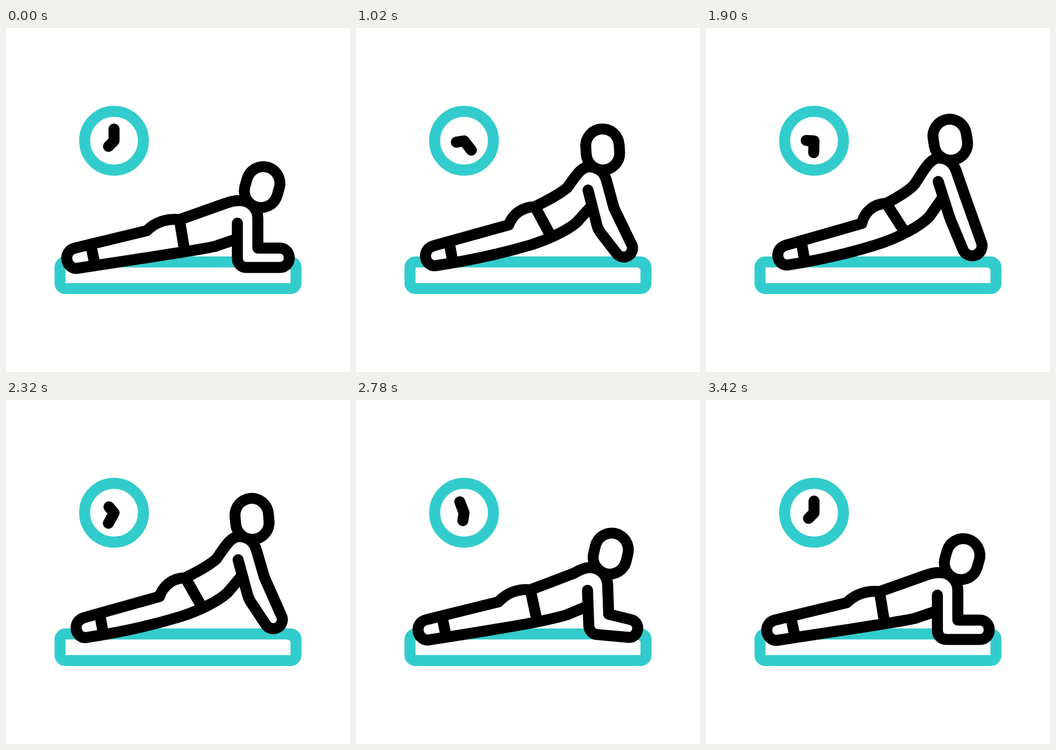
Write an HTML page that moves like this. It is 640x640 px and loops after 3.6 s.

```html
<!DOCTYPE html>
<html lang="en">
<head>
<meta charset="utf-8">
<title>Plank to push-up</title>
<style>
  html, body { margin: 0; width: 100%; height: 100%; overflow: hidden; background: #fff; }
  svg { display: block; width: 100vw; height: 100vh; }
  path { stroke-linecap: round; stroke-linejoin: round; }
  .teal { fill: none; stroke: #33cccc; stroke-width: 20.5; }
  .ink { fill: #fff; stroke: #000; stroke-width: 20.5; }
  .band { stroke-linecap: butt; }
</style>
</head>
<body>
<svg viewBox="0 0 640 640">
  <rect class="teal" x="100.5" y="435.2" width="439" height="49.6" rx="10"/>
  <path d="M522 445Q527 446 530 450V445Z" fill="#33cccc"/>
  <circle class="teal" cx="201" cy="209.7" r="54.7"/>
  <path id="hands" class="ink" style="fill:none"/>
  <path id="body" class="ink"/>
  <path id="bands" class="ink band"/>
  <path id="arm" class="ink"/>
  <path id="head" stroke="#000" stroke-width="82.5"/>
  <path id="face" stroke="#fff" stroke-width="42"/>
</svg>
<script>
const LOOP = 3600, START = 110, TOP = 1690, END = 3440;
const OVERSHOOT = 1.035; // the raised outlines sit just short of the highest pose

// Each part: [lowered outline, raised outline] with matching commands.
const parts = {
  body: [
    `M435 321C426 321 418 322.5 409 326C380 336 352 346.5 323 356.5
     C300 354 278 361 262 377L128 409.5C118.5 412 113 419.5 113 428
     C113 440 122.5 448.5 133 447C193 438 255 428.5 315 419
     C340 415 364 411.5 388 406.5L431 392`,
    `M433 244C417 244 405 267 389 291C381 301 358 315 335 327
     C309 328 294 345 289 364L147 404.5C138 407.5 133 414.5 133 423
     C133 434 142 442.5 152 441C212 432 280 416 328 400
     C357 390 397 371 415 352L441 316`
  ],
  bands: [
    'M323 358L331.5 410M158 405L165 438M431 387L468.5 387',
    'M337 330L368 379M177 398L183 432M442 309L474 298'
  ],
  arm: [
    `M430.5 363L430.5 428C430.5 438 437.5 445.5 447 445.5L510 445.5
     C519.7 445.5 527 437.5 527 427.5C527 418 519.7 409.5 510 409.5
     L468.5 409.5L468.5 354C468.5 336 454 321 435 321`,
    `M432 287.5L452 352C454 358 456 363 459 369L478.5 412.5
     C482 421.4 492.7 426.4 502 422.8C511.3 419.3 516 408.4 512.5 399.5
     L482.5 318L465.5 268C460 252 448 244 433 244`
  ],
  head: ['M478.5 289L474.5 303', 'M454 203L456 217']
};

const draw = (id, d) => document.getElementById(id).setAttribute('d', d);

function morph([low, high], k) {
  const target = high.match(/[\d.]+/g);
  let i = 0;
  return low.replace(/[\d.]+/g, n => (+n + (target[i++] - n) * k).toFixed(2));
}

// Cubic Bezier easing with flat ends; x1 and x2 are its horizontal handles.
function ease(x, x1, x2) {
  if (x <= 0) return 0;
  if (x >= 1) return 1;
  let lo = 0, hi = 1, s;
  for (let i = 0; i < 24; i++) {
    s = (lo + hi) / 2;
    const r = 1 - s;
    if (3 * r * r * s * x1 + 3 * r * s * s * x2 + s ** 3 < x) lo = s;
    else hi = s;
  }
  return s * s * (3 - 2 * s);
}

function handTip(degrees, length) {
  const a = degrees * Math.PI / 180;
  return `${201 + length * Math.sin(a)} ${210 - length * Math.cos(a)}`;
}

function render(now) {
  const t = now % LOOP;
  const up = ease((t - START) / (TOP - START), .833, .167);
  const down = ease((t - TOP) / (END - TOP), .77, .13);
  const k = (up - down) * OVERSHOOT;

  for (const id in parts) draw(id, morph(parts[id], k));
  draw('face', morph(parts.head, k));
  draw('hands', `M${handTip(180 * (up + down), 22)}L201 210L${handTip(225 + 45 * up + 315 * down, 14.6)}`);
  requestAnimationFrame(tick);
}

let begin;
function tick(now) {
  begin ??= now;
  render(now - begin);
}
requestAnimationFrame(tick);
</script>
</body>
</html>
```
